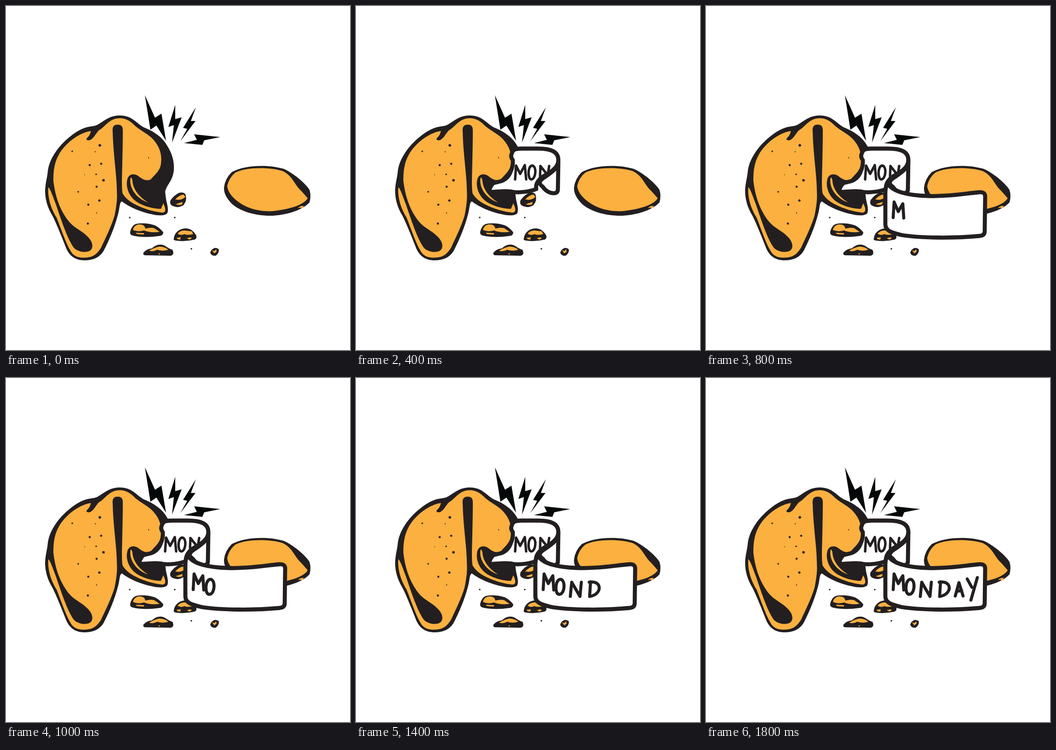
Recreate the animation shown at these times as an HTML page with a canvas. Size 748 by 748 pixels, loop 2 s.

```html
<!DOCTYPE html>
<html lang="en">
<head>
<meta charset="utf-8">
<title>Monday cookie</title>
<style>
html, body { margin: 0; width: 100%; height: 100%; overflow: hidden; background: #fff; }
canvas { display: block; width: 100vmin; height: 100vmin; }
</style>
</head>
<body>
<canvas id="stage" width="748" height="748"></canvas>
<script>
const ctx = document.getElementById('stage').getContext('2d');
const INK = '#231f20', DOUGH = '#fbb040', PAPER = '#fff', BOLT = '#050808';
const STEP = 200, STEPS = 10;

function fill(color, ...paths) {
  ctx.fillStyle = color;
  for (const d of paths) ctx.fill(new Path2D(d));
}

function stroke(width, d) {
  ctx.strokeStyle = INK;
  ctx.lineWidth = width;
  ctx.lineCap = ctx.lineJoin = 'round';
  ctx.stroke(new Path2D(d));
}

function outlined(d, width = 8.8) {
  fill(PAPER, d);
  stroke(width, d);
}

const cookie = {
  outline: 'M171 553C152 553 139 545 131 527C121 502 111 476 101 456C90 438 85 420 85 401C86 382 90 372 91 358C95 331 115 301 147 278C161 268 173 263 190 261C207 259 218 238 247 238C275 238 283 255 300 264C322 273 340 285 350 303C362 322 366 338 365 357C362 382 350 387 346 404L348 420C350 430 354 442 351 450C347 457 330 456 318 453C292 448 270 438 252 425C246 427 248 440 243 455C236 482 224 510 212 533C203 547 190 553 171 553Z',
  dough: 'M92 394C90 420 100 444 110 460C120 485 130 515 139 530C146 545 158 548 172 547C190 547 199 538 207 525C216 505 229 480 236 456C240 436 242 420 242 400L250 400C254 412 265 424 282 432C300 441 320 447 338 449C346 450 348 445 345 436L342 429L337 441C318 441 292 434 277 420C265 408 260 390 264 376C268 364 280 364 288 370C298 378 306 381 315 377C322 368 336 358 337 342C340 322 333 304 319 289C305 275 288 269 277 257C265 246 256 244 247 244C225 244 215 263 204 269C196 274 191 290 181 292C174 292 173 290 178 285C183 280 183 276 185 272C163 274 131 295 115 323C104 342 103 362 103 380Z',
  shadow: 'M92 394C97 398 102 415 108 430C120 465 133 505 147 525C155 535 175 538 184 531C191 524 188 512 178 502C165 488 150 484 138 470C118 446 107 415 103 380L90 380Z',
  stem: 'M243 258C233 258 231 264 232 274C233 320 241 370 241 400L242 425L250 425L254 412C252 400 252 390 252 380C253 340 254 300 254 270C254 262 251 258 243 258Z',
  glint: 'M271 373C266 394 284 420 309 427C292 417 276 400 275 380Q274 373 271 373Z'
};

// x, y, size
const freckles = [[144,316,3],[204,303,5],[194,317,2],[182,346,4],[207,343,4],[310,330,2],[171,367,1.5],
  [196,366,3],[212,379,5],[157,404,3],[197,393,4],[179,432,4],[203,423,4.5],[178,473,4],[197,450,2]];
const specks = [[269,460,3],[367,460,3],[403,528,3]];

const bolts = [
  'M302 194L324 243L338 234L348 293L327 260L314 269Z',
  'M368 215L368 246L382 242L361 297L365 259L353 263Z',
  'M413 220L402 250L412 250L379 294L394 267L385 265Z',
  'M466 285L409 279L415 291L387 298L427 302L431 292Z'
];

const crumbs = [
  'M358 422Q366 411 377 406Q386 404 390 409Q395 422 386 433Q378 438 370 437Q353 434 358 422Z',
  'M270 491Q273 478 282 474Q302 470 324 477Q334 482 342 492Q342 499 334 500Q300 505 275 499Q269 497 270 491Z',
  'M365 505Q366 494 377 487Q391 480 403 487Q411 493 414 500Q415 506 410 508Q388 513 369 510Q363 509 365 505Z',
  'M299 536Q306 528 317 527Q333 513 348 523Q357 529 362 530Q367 541 358 543L302 542Q297 541 299 536Z',
  'M444 536Q447 528 454 526Q461 526 463 530Q463 538 456 543Q446 544 444 536Z'
];
const crumbTops = [
  'M368 421Q376 411 386 410L390 415Q382 423 371 421Z',
  'M369 431L384 426L383 431Q377 434 369 431Z',
  'M276 487Q278 477 288 475Q302 474 303 484Q313 481 322 483L334 491Q315 494 300 488Q288 492 276 487Z',
  'M282 493L300 494L300 497L285 496Z',
  'M373 495Q379 488 388 488L404 490L407 496Q394 499 388 496Q380 500 373 495Z',
  'M371 504L380 503L379 508L373 507Z',
  'M393 505L401 503L404 505L399 508Z',
  'M311 532Q323 525 334 523Q347 524 353 530Q340 534 329 530Q320 535 311 532Z',
  'M331 538L335 538L333 541Z',
  'M448 531L453 533L457 529L458 534L453 538Z'
];

const shell = {
  outline: 'M474 395Q476 376 491 361C520 345 574 344 606 355C630 367 652 387 660 400Q664 413 660 427C642 447 600 456 575 456C540 456 510 446 492 431Q473 412 474 395Z',
  dough: 'M481 391Q485 373 499 362C524 350 574 350 602 359C624 370 627 389 642 402L656 418C646 434 615 442 580 446C545 448 518 437 499 421Q482 406 481 391Z',
  chip: 'M635 440Q638 434 648 435L643 441L640 438Z'
};

const strip = 'M339 320C341 312 347 310 360 310L395 310C425 310 440 317 440 335C440 352 422 362 408 370C396 378 390 388 392 398C380 403 355 407 340 404C325 400 305 405 289 404Q292 391 299 385L315 381Q330 376 336 361Q342 348 341 335Q335 328 339 320Z';
const curl = 'M440 338C440 352 424 363 412 371C396 381 397 386 406 393C412 402 422 408 432 407Q439 406 439 398Z';
const banner = 'M396 386C405 405 445 412 480 413C520 415 560 408 594 405Q607 404 607 414L606 490Q606 499 595 500C540 505 470 505 425 498C404 493 390 489 390 475L390 402Q390 393 396 386Z';
const fold = 'M440 336C440 355 420 362 406 371C396 378 391 388 390 402';

const smallWord = 'M346 377L348 347L357 365L367 346L370 377M383 347C373 348 373 376 381 377C391 377 394 348 383 347M400 375L401 348L417 368L420 348';
const letters = [
  'M407 460L409 426L418 447L428 430L430 461',
  'M446 438C434 435 431 466 440 470C453 474 457 442 446 438',
  'M466 475L469 444L487 475L490 444',
  'M510 443L508 475M507 444C536 439 536 471 508 475',
  'M542 474L550 445L559 474M545 464L556 462',
  'M568 437L578 455M590 434L576 483'
];

function drawDots(points) {
  ctx.fillStyle = INK;
  points.forEach(([x, y, size], i) => {
    ctx.save();
    ctx.translate(x, y);
    ctx.rotate(i);
    ctx.fillRect(-size / 2, -size / 2, size, size);
    ctx.restore();
  });
}

function drawScene() {
  fill(INK, cookie.outline);
  fill(DOUGH, cookie.dough, cookie.glint);
  fill(INK, cookie.shadow, cookie.stem);
  drawDots(freckles);
  drawDots(specks);
  fill(BOLT, ...bolts);
  fill(INK, ...crumbs, shell.outline);
  fill(DOUGH, ...crumbTops, shell.dough, shell.chip);
}

function draw(step) {
  fill(PAPER, 'M0 0H748V748H0Z');
  drawScene();
  if (step >= 1) {
    outlined(strip);
    if (step >= 2) stroke(5.4, smallWord);
    outlined(curl);
  }
  if (step >= 3) {
    outlined(banner);
    stroke(8.8, fold);
  }
  letters.slice(0, Math.max(0, step - 3)).forEach(d => stroke(6.6, d));
}

let start = null;
function tick(now) {
  start ??= now;
  draw(Math.floor((now - start) / STEP) % STEPS);
  requestAnimationFrame(tick);
}
draw(0);
requestAnimationFrame(tick);
</script>
</body>
</html>
```
